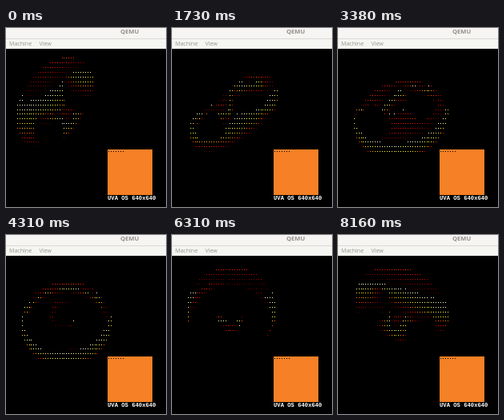
Recreate the animation shown at these times as an HTML page with a canvas. Size 200x224 px, loop 8230 ms.

```html
<!DOCTYPE html>
<html lang="en">
<head>
<meta charset="utf-8">
<title>Spinning torus</title>
<style>
  html, body { margin: 0; width: 100%; height: 100%; overflow: hidden; background: #000; }
  canvas { display: block; width: 200px; height: 224px; }
</style>
</head>
<body>
<canvas id="stage" width="200" height="224"></canvas>
<script>
const ctx = document.getElementById('stage').getContext('2d');
const LOOP = 8230, TICK = 66.37;
const COLS = 51, ROWS = 22;
const FACE_ON_STEP = 52, TURN = 5 / 128;

const dotX = col => Math.floor(2.93 * col - 0.3);
const dotY = row => Math.floor(37.9 + 5.83 * (row - 1));

// The torus advances on five of every eight ticks.
function stepAt(ms) {
  const tick = Math.floor((ms % LOOP + 10) / TICK);
  return Math.min(77, Math.floor(5 * (tick + 1) / 8));
}

// Black to red to yellow to white.
function heat(value) {
  const ramp = start => Math.max(0, Math.min(255, (value - start) * 3));
  return `rgb(${ramp(0)},${ramp(85)},${ramp(170)})`;
}

function torus(step) {
  const phase = (step - FACE_ON_STEP) * TURN;
  const a = 1.5 * Math.PI + phase, b = phase / 2;
  const sA = Math.sin(a), cA = Math.cos(a), sB = Math.sin(b), cB = Math.cos(b);
  const depth = new Uint16Array(COLS * ROWS).fill(256);
  const light = new Uint8Array(COLS * ROWS);
  for (let j = 0; j < 90; j++) {
    const tube = j * 2 * Math.PI / 90;
    const cj = Math.cos(tube), sj = Math.sin(tube);
    for (let i = 0; i < 324; i++) {
      const ring = i * 2 * Math.PI / 324;
      const ci = Math.cos(ring), si = Math.sin(ring);
      const r = cj + 2;
      const px = ci * r, py = cA * sj - sA * si * r;
      const pz = sA * sj + cA * si * r;
      const col = 25 + Math.trunc(30 * (cB * px - sB * py) / (pz + 5));
      const row = 12 + Math.trunc(15 * (cB * py + sB * px) / (pz + 5));
      if (col < 1 || col >= COLS || row < 1 || row >= ROWS) continue;
      const cell = col + COLS * row;
      // Unsigned byte depth: the far half covers the near half.
      const order = Math.floor(pz * 32) & 255;
      if (order >= depth[cell]) continue;
      depth[cell] = order;
      const ny = cB * (cA * sj - sA * cj * si) + sB * cj * ci;
      const nz = sA * sj + cA * cj * si;
      // Byte brightness overflows on the most strongly lit side.
      light[cell] = Math.max(0, Math.floor(-256 * (ny + nz)));
    }
  }
  return light;
}

function label(text, x, y, font, color) {
  ctx.font = font;
  ctx.fillStyle = color;
  ctx.fillText(text, x, y);
}

function box(x, y, w, h, color) {
  ctx.fillStyle = color;
  ctx.fillRect(x, y, w, h);
}

function drawWindow() {
  box(0, 0, 200, 224, '#000');
  box(0, 0, 200, 13, '#f6f5f4');
  box(0, 13, 200, 13, '#f5f5f2');
  box(0, 13, 200, 1, '#dcd9d5');
  label('QEMU', 143, 7.4, 'bold 7.6px "Open Sans", sans-serif', '#938f8a');
  const menuFont = '7.1px "Open Sans", sans-serif';
  label('Machine', 4, 22.3, menuFont, '#96968f');
  label('View', 41.5, 22.3, menuFont, '#96968f');
  box(127, 152, 56, 57, '#f58025');
  label('UVA OS 640x640', 127, 215.3, 'bold 7.2px "Liberation Mono", monospace', '#fff');
}

function drawTorus(light) {
  for (let row = 1; row < ROWS; row++) {
    for (let col = 1; col < COLS; col++) {
      box(dotX(col), dotY(row), 1, 1, heat(light[col + COLS * row]));
    }
  }
}

let shown = -1;
function frame(now) {
  const step = stepAt(now);
  if (step !== shown) {
    shown = step;
    drawWindow();
    drawTorus(torus(step));
  }
  requestAnimationFrame(frame);
}
frame(0);
</script>
</body>
</html>
```
